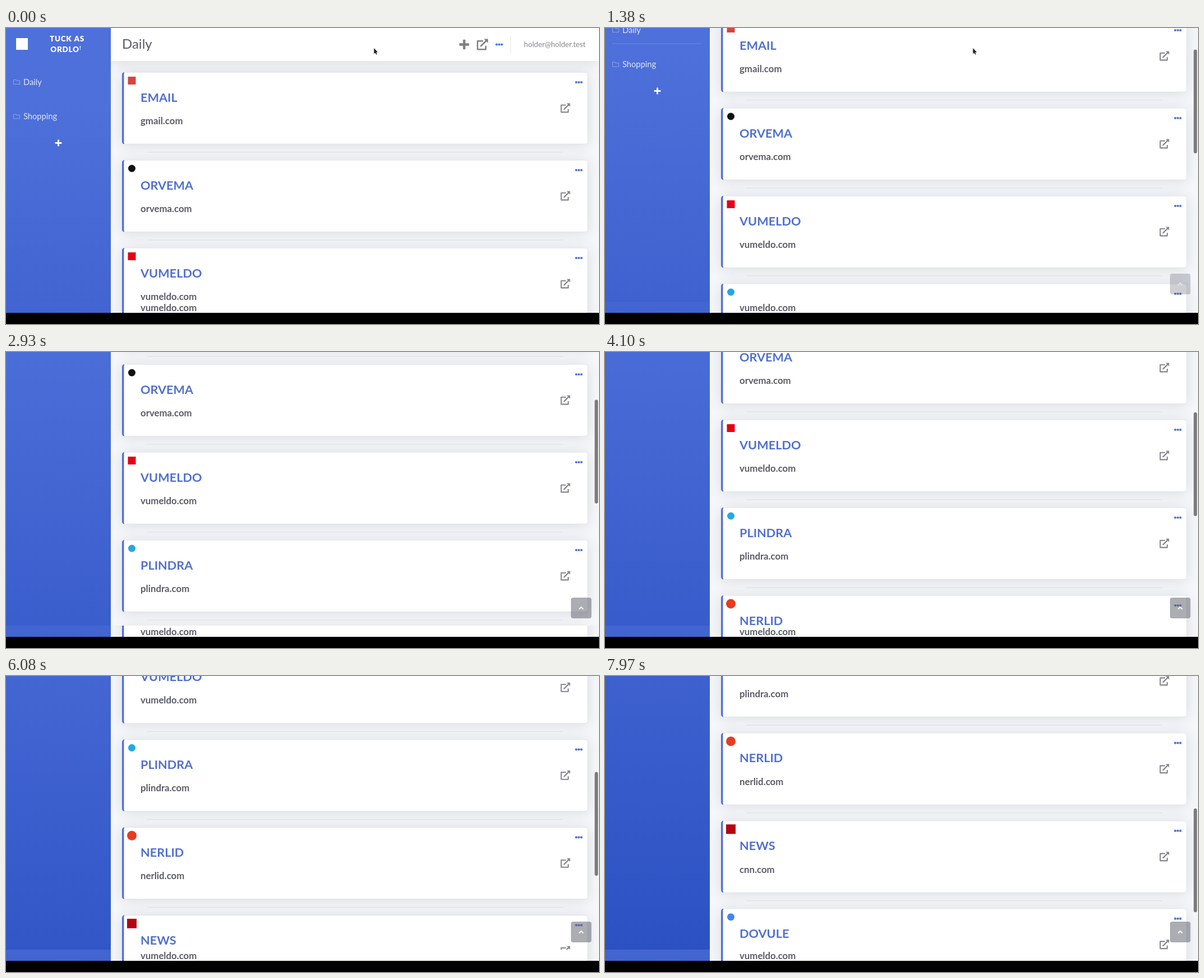
Write an HTML page with a canvas that moves like this. It is 1058 px wide and 529 px high and loops after 8000 ms.

```html
<!DOCTYPE html>
<html lang="en">
<head>
<meta charset="utf-8">
<title>Bookmarks</title>
<style>
html, body { margin: 0; width: 100%; height: 100%; overflow: hidden; background: #000; }
canvas { display: block; }
</style>
</head>
<body>
<canvas id="stage" width="1058" height="529"></canvas>
<script>
const ctx = document.getElementById('stage').getContext('2d');
const W = 1058, VIEW = 509, SIDE = 187, LOOP = 8000;
const BLUE = '#4e70da', GREY = '#85868e', DARK = '#5a5b66';
const PITCH = 157, CARD_TOP = 79;

const cards = [
  { title: 'EMAIL', url: 'gmail.com', color: '#d9443e', size: 14 },
  { title: 'ORVEMA', url: 'orvema.com', color: '#111', size: 13, round: true },
  { title: 'VUMELDO', url: 'vumeldo.com', color: '#e60012', size: 14 },
  { title: 'PLINDRA', url: 'plindra.com', color: '#22a9e4', size: 13, round: true },
  { title: 'NERLID', url: 'nerlid.com', color: '#e63c22', size: 17, round: true },
  { title: 'NEWS', url: 'cnn.com', color: '#b5040f', size: 17 },
  { title: 'DOVULE', url: 'dovule.com', color: '#4285f4', size: 13, round: true }
];

// Bursts of evenly spaced scroll updates: [first, last, count]
const bursts = [
  [100, 880, 9], [1000, 1760, 9], [1860, 2620, 9], [2720, 3490, 9], [3590, 4350, 9],
  [4460, 5230, 9], [5340, 6080, 9], [6190, 6920, 9], [7020, 7800, 9], [7880, 7970, 2]
];
// [update index, scroll offset]
const path = [[0, 0], [12, 84.5], [14, 93], [30, 214], [42, 272], [54, 363.3], [72, 510], [83, 605.3]];

function updateIndex(t) {
  let n = 0;
  for (const [first, last, count] of bursts) {
    if (t < first) break;
    const gap = (last - first) / (count - 1);
    n += Math.min(count, Math.floor((t - first) / gap) + 1);
  }
  return n;
}

function scrollAt(n) {
  const i = Math.max(1, path.findIndex(p => p[0] >= n));
  const [n0, s0] = path[i - 1], [n1, s1] = path[i];
  return s0 + (s1 - s0) * (n - n0) / (n1 - n0);
}

function text(str, x, y, font, color, align = 'left', spacing = 0) {
  ctx.font = font + ' Lato, sans-serif';
  ctx.letterSpacing = spacing + 'px';
  ctx.textAlign = align;
  ctx.fillStyle = color;
  ctx.fillText(str, x, y);
}

function rect(x, y, w, h, color) {
  ctx.fillStyle = color;
  ctx.fillRect(x, y, w, h);
}

function pill(x, y, w, h, r, color) {
  ctx.fillStyle = color;
  ctx.beginPath();
  ctx.roundRect(x, y, w, h, r);
  ctx.fill();
}

function line(points, color, width) {
  ctx.strokeStyle = color;
  ctx.lineWidth = width;
  ctx.beginPath();
  points.forEach(p => ctx.lineTo(...p));
  ctx.stroke();
}

function badge(x, y, size, color, round) {
  pill(x - size / 2, y - size / 2, size, size, round ? size / 2 : 0, color);
}

function plus(x, y, size, thick, color) {
  pill(x - size / 2, y - thick / 2, size, thick, 1, color);
  pill(x - thick / 2, y - size / 2, thick, size, 1, color);
}

function dots(x, y, gap) {
  for (let i = -1; i <= 1; i++) badge(x + i * gap, y, 4.2, BLUE, true);
}

function linkIcon(x, y, size, color) {
  ctx.save();
  ctx.translate(x - size / 2, y - size / 2);
  ctx.scale(size / 17, size / 17);
  ctx.lineJoin = 'round';
  line([[9.5, 3.2], [1.1, 3.2], [1.1, 15.9], [13.6, 15.9], [13.6, 10.5]], color, 2.1);
  line([[5.6, 11.4], [14.5, 2.5]], color, 2.3);
  ctx.fillStyle = color;
  ctx.beginPath();
  ctx.moveTo(10.8, 0);
  ctx.lineTo(17, 0);
  ctx.lineTo(17, 6.2);
  ctx.fill();
  ctx.restore();
}

function shadow(on) {
  ctx.shadowColor = on ? 'rgba(58,59,69,0.15)' : 'transparent';
  ctx.shadowBlur = on ? 24 : 0;
  ctx.shadowOffsetY = on ? 2 : 0;
}

function folder(x, y) {
  ctx.lineJoin = 'round';
  ctx.strokeStyle = 'rgba(255,255,255,0.35)';
  ctx.lineWidth = 1.1;
  ctx.beginPath();
  [[0, 0], [4, 0], [5.5, 1.5], [11, 1.5], [11, 8], [0, 8]].forEach(([a, b]) => ctx.lineTo(x + a, y + b));
  ctx.closePath();
  ctx.stroke();
}

function sidebar(ruled) {
  const fill = ctx.createLinearGradient(0, 0, 0, 1315);
  fill.addColorStop(0.1, '#4e70da');
  fill.addColorStop(1, '#244abd');
  rect(0, -40, SIDE, 1400, fill);

  badge(28.5, 28.5, 21, '#fff');
  text('TUCK AS', 109, 23.5, '900 13.5px', '#fff', 'center', 0.7);
  text('ORDLO', 105, 43, '900 13.5px', '#fff', 'center', 0.7);
  text('!', 132.5, 38.5, '900 9.5px', '#fff', 'center');

  ['Daily', 'Shopping'].forEach((name, i) => {
    const y = 96.5 + i * 61.5;
    folder(13.5, y - 4);
    text(name, 31, y + 5, '14.7px', 'rgba(255,255,255,0.82)');
  });
  if (ruled) rect(13, 120.5, 160, 1, 'rgba(255,255,255,0.17)');
  plus(93.5, 205.5, 12, 2.8, '#fff');
}

function topbar() {
  shadow(true);
  rect(SIDE, -60, W - SIDE, 119, '#fff');
  shadow(false);
  text('Daily', 207, 37, '24px', DARK);
  plus(817.5, 29.5, 17.5, 4.4, '#808084');
  linkIcon(850, 29.5, 20, '#808084');
  dots(880, 29.5, 4.7);
  rect(900, 14, 1, 31, '#e3e5ee');
  text('holder@holder.test', 1034, 34, '13.2px', GREY, 'right');
}

function card(item, y) {
  const x = 207, w = 831, h = 128.5;
  shadow(true);
  pill(x, y, w, h, 4.5, '#e3e6f0');
  shadow(false);
  ctx.save();
  ctx.beginPath();
  ctx.roundRect(x, y, w, h, 4.5);
  ctx.clip();
  rect(x, y, 4, h, BLUE);
  ctx.restore();
  pill(x + 3.4, y + 0.8, w - 4.2, h - 1.6, [2, 4, 4, 2], '#fff');

  badge(224.5, y + 15, item.size, item.color, item.round);
  text(item.title, 240, y + 52.5, 'bold 21.7px', '#506fd2');
  text(item.url, 240, y + 93, 'bold 16.8px', DARK);
  dots(1022, y + 18, 4.6);
  linkIcon(998, y + 64, 17, GREY);
}

function page(scroll, ruled) {
  ctx.save();
  ctx.translate(0, -scroll);
  rect(SIDE, -40, W - SIDE, 1400, '#f6f7fa');
  cards.forEach((item, i) => card(item, CARD_TOP + i * PITCH));
  cards.forEach((item, i) => rect(252, 221.5 + i * PITCH, 742, 1, 'rgba(0,0,0,0.08)'));
  topbar();
  sidebar(ruled);
  ctx.restore();
}

function band(top, bottom, scroll, ruled) {
  ctx.save();
  ctx.beginPath();
  ctx.rect(0, top, W, bottom - top);
  ctx.clip();
  page(scroll, ruled);
  ctx.restore();
}

function topButton(alpha) {
  ctx.globalAlpha = alpha;
  pill(1008, 439, 36.5, 37, 4, 'rgba(90,92,105,0.5)');
  ctx.lineJoin = 'miter';
  line([[1022.5, 459.5], [1026.2, 455.8], [1029.9, 459.5]], '#fff', 2);
  ctx.globalAlpha = 1;
}

function pointer(x, y) {
  ctx.beginPath();
  [[0, 0], [0, 10.2], [2.3, 8.2], [3.9, 11.6], [5.4, 10.9], [3.9, 7.6], [6.9, 7.3]]
    .forEach(([a, b]) => ctx.lineTo(x + a, y + b));
  ctx.closePath();
  ctx.lineJoin = 'round';
  ctx.strokeStyle = '#fff';
  ctx.lineWidth = 1.6;
  ctx.stroke();
  ctx.fillStyle = '#222';
  ctx.fill();
}

function draw(t) {
  const n = updateIndex(t), scroll = scrollAt(n);
  rect(0, 0, W, 529, '#000');
  band(0, 489, scroll, n > 0);
  band(489, VIEW, -20, false); // the lower strip stays put

  const fade = Math.min(1, Math.max(0, (t - 1160) / 400));
  if (fade > 0) topButton(0.5 - Math.cos(fade * Math.PI) / 2);
  if (n > 0) pill(1050.3, 2.4 + scroll * 0.387, 6, 185.5, 3, '#7b7b7e');
  if (n < 22) pointer(656.5, 36);
}

const start = performance.now();
function tick() {
  draw((performance.now() - start) % LOOP);
  requestAnimationFrame(tick);
}
tick();
</script>
</body>
</html>
```
